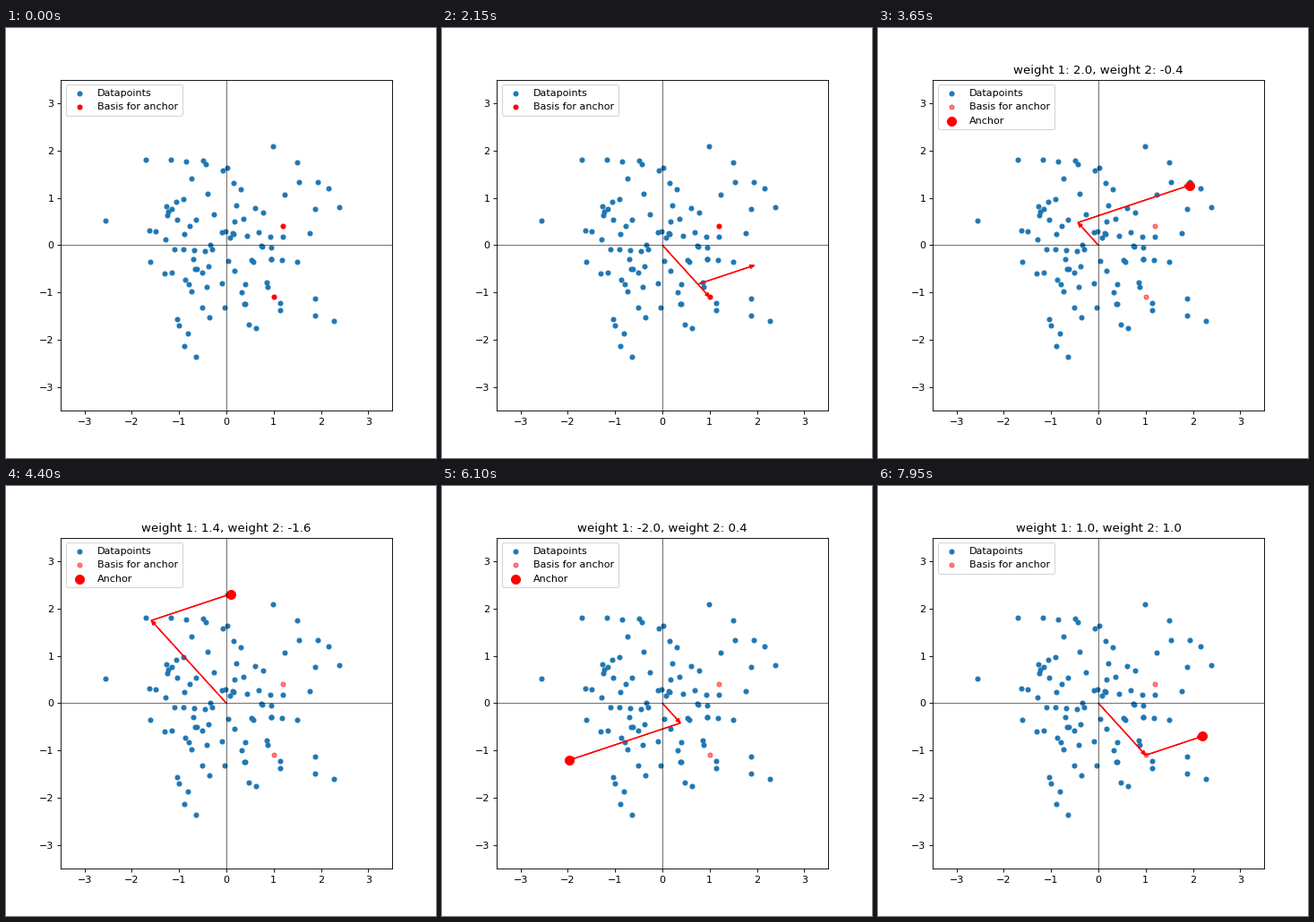
A matplotlib script for the animation above (8000 ms loop, 480 px wide and 480 px high).

```python
import numpy as np
import matplotlib.pyplot as plt
from matplotlib.animation import FuncAnimation

FRAMES, INTERVAL = 160, 50
GROW, SLIDE, FADE, TURN, END = 9, 28, 48, 59, 158

b1 = np.array([1.2, 0.4])
b2 = np.array([1.0, -1.1])
basis = np.array([b1, b2])
origin = np.zeros(2)

rng = np.random.RandomState(0)
data = rng.randn(100, 2)
data -= data.mean(axis=0)

fig, ax = plt.subplots(figsize=(6, 6), dpi=80)
ax.set_aspect("equal")
ax.set_xlim(-3.5, 3.5)
ax.set_ylim(-3.5, 3.5)
ax.axhline(0, color="black", linewidth=0.5)
ax.axvline(0, color="black", linewidth=0.5)

points = ax.scatter(data[:, 0], data[:, 1], s=20, label="Datapoints")
basis_dots = ax.scatter(basis[:, 0], basis[:, 1], s=20, color="red",
                        label="Basis for anchor")
anchor = ax.scatter([0], [0], s=80, color="red", label="Anchor")
title = ax.set_title("")
arrows = []


def clamp(t):
    return min(max(t, 0.0), 1.0)


def draw_arrow(start, vec):
    if np.hypot(*vec) < 1e-6:
        return
    arrows.append(ax.arrow(*start, *vec, color="red", width=0.01,
                           head_width=0.08, head_length=0.1,
                           length_includes_head=True))


def weights(angle):
    """Weights that put b1 and b2 together at the turned anchor."""
    c, s = np.cos(angle), np.sin(angle)
    spot = np.array([[c, -s], [s, c]]) @ (b1 + b2)
    return np.linalg.solve(basis.T, spot)


def update(frame):
    while arrows:
        arrows.pop().remove()

    grow = clamp((frame - GROW) / (SLIDE - 1 - GROW))
    slide = clamp((frame - SLIDE) / (FADE - SLIDE))
    fade = clamp((frame - FADE) / 10)
    turn = clamp((frame - TURN) / (END - TURN))

    w1, w2 = weights(2 * np.pi * turn) if frame >= TURN else (grow, grow)
    first = w2 * b2
    draw_arrow(origin, first)
    draw_arrow(slide * first, w1 * b1)

    basis_dots.set_alpha(1 - 0.5 * fade)
    anchor.set_alpha(fade)
    anchor.set_visible(fade > 0)
    anchor.set_offsets([w1 * b1 + w2 * b2])

    handles = [points, basis_dots]
    if TURN <= frame <= END:
        handles.append(anchor)
    ax.legend(handles=handles, loc="upper left")
    title.set_text(f"weight 1: {w1:.1f}, weight 2: {w2:.1f}"
                   if frame >= TURN else "")
    return []


anim = FuncAnimation(fig, update, frames=FRAMES, interval=INTERVAL,
                     init_func=lambda: update(0), repeat=True,
                     repeat_delay=0, blit=False)
plt.show()
```
